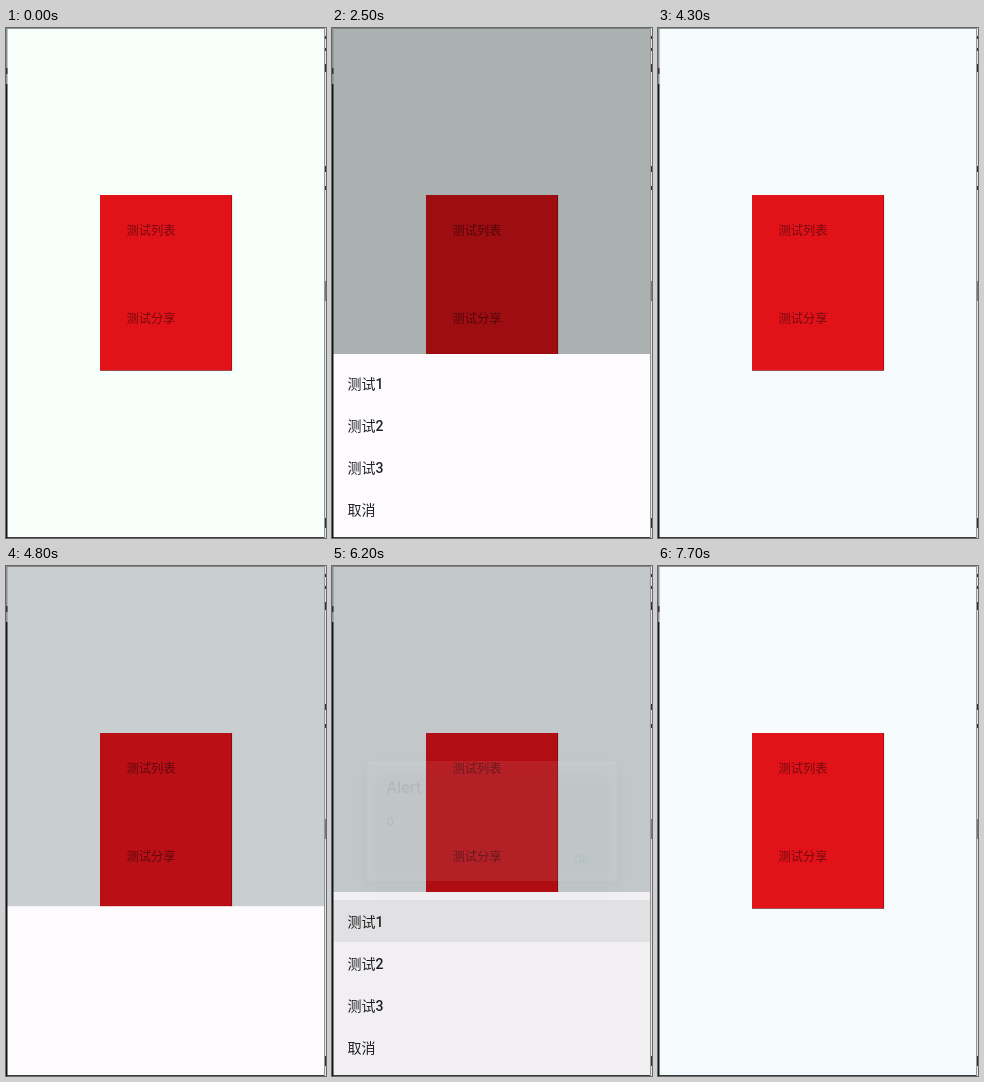
Write an HTML page with a canvas that moves like this. It is 320 px wide and 510 px high and loops after 8 s.

```html
<!DOCTYPE html>
<html lang="zh-CN">
<head>
<meta charset="utf-8">
<style>
  html, body { margin: 0; width: 100%; height: 100%; overflow: hidden; background: #f5fbfd; }
  canvas { display: block; width: 320px; height: 510px; }
</style>
</head>
<body>
<canvas id="stage"></canvas>
<script>
const W = 320, H = 510, LOOP = 8000, STEP = 100;
const SHEET_HEIGHT = 184, ROW = 42;
const FONT = 'Roboto, "Noto Sans CJK SC", "Noto Sans CJK", sans-serif';
const ITEMS = ['测试1', '测试2', '测试3', '取消'];

const canvas = document.getElementById('stage');
const ctx = canvas.getContext('2d');
const scale = window.devicePixelRatio || 1;
canvas.width = W * scale;
canvas.height = H * scale;

const progress = (t, start, duration) => Math.min(1, Math.max(0, (t - start) / duration));
const easeOut = p => 1 - (1 - p) ** 2;

function rect(x, y, w, h, color) {
  ctx.fillStyle = color;
  ctx.fillRect(x, y, w, h);
}

function text(string, x, baseline, size, color, weight = 400) {
  ctx.font = `${weight} ${size}px ${FONT}`;
  ctx.fillStyle = color;
  ctx.fillText(string, x, baseline);
}

const dim = amount => amount > 0 && rect(0, 0, W, H, `rgba(0,0,0,${amount})`);

function drawPage(t) {
  rect(0, 0, W, H, t < 800 ? '#f7fffa' : '#f5fbfd');
  rect(94, 167, 132, 175.5, '#e21219');
  rect(94, 342, 132, 0.7, 'rgba(60,0,0,.6)');
  rect(225.5, 167, 0.6, 175, 'rgba(60,0,0,.6)');
  text('测试列表', 120.5, 206.8, 12.25, '#760b10');
  text('测试分享', 120.5, 294.8, 12.25, '#760b10');
}

// The backdrop fades before the sheet slides away.
function drawSheet(t, { open, close, pressed }) {
  if (t < open || t > close + 600) return;
  dim(0.3 * progress(t, open, 430) * (1 - progress(t, close, 340)));

  const hidden = 1 - easeOut(progress(t, open, 360)) + progress(t, close + 170, 360) ** 2;
  const top = H - SHEET_HEIGHT * (1 - hidden);
  rect(0, top, W, SHEET_HEIGHT, '#fdfbfe');
  if (t < open + 450) return;
  if (t >= pressed) rect(0, top + 8, W, ROW, '#ececee');
  ITEMS.forEach((item, i) => text(item, 15.5, top + 34.5 + i * ROW, 14, '#202022', 500));
}

function drawAlert(t) {
  const enter = progress(t, 6180, 250);
  const leave = progress(t, 7230, 200);
  dim(0.565 * enter * (1 - progress(t, 7230, 300)));
  const alpha = enter * (1 - leave);
  if (!alpha) return;

  const zoom = 0.9 + 0.1 * easeOut(enter);
  ctx.save();
  ctx.globalAlpha = alpha;
  ctx.translate(160, 255);
  ctx.scale(zoom, zoom);
  ctx.translate(-160, -255);
  ctx.shadowColor = 'rgba(0,0,0,.45)';
  ctx.shadowBlur = 18 * scale;
  ctx.shadowOffsetY = 7 * scale;
  ctx.fillStyle = '#fdfbfe';
  ctx.beginPath();
  ctx.roundRect(23.5, 189.5, 273, 131, 2);
  ctx.fill();
  ctx.shadowColor = 'transparent';
  text('Alert', 44.7, 224, 17.5, '#202022', 500);
  text('0', 44.7, 260, 14, '#202022');
  text('OK', 249.7, 300.5, 12, '#17959b', 500);
  ctx.restore();
}

function drawWindowEdges() {
  rect(0, 0, W, 0.8, '#77797a');
  rect(0, 509, W, 1, '#3a3b3c');
  rect(0, 0, 1.5, 56, '#8c8e90');
  rect(0, 40, 1.5, 6, '#333');
  rect(0, 56, 1.5, 454, '#151517');
  rect(318, 0, 1, H, '#939597');
  rect(319, 0, 1, H, '#e2e3e5');
  for (const [y, h] of [[8, 3], [20, 3], [36, 8], [138, 6], [158, 4], [490, 10]]) {
    rect(319, y, 1, h, '#333');
  }
  rect(319, 253, 1, 20, '#77797a');
}

function draw(now) {
  const t = Math.floor((now % LOOP) / STEP) * STEP;
  ctx.setTransform(scale, 0, 0, scale, 0, 0);
  drawPage(t);
  drawSheet(t, { open: 700, close: 3250, pressed: Infinity });
  drawSheet(t, { open: 4540, close: 6050, pressed: 6000 });
  drawAlert(t);
  drawWindowEdges();
}

let start;
function frame(now) {
  start ??= now;
  draw(now - start);
  requestAnimationFrame(frame);
}
draw(0);
requestAnimationFrame(frame);
</script>
</body>
</html>
```
